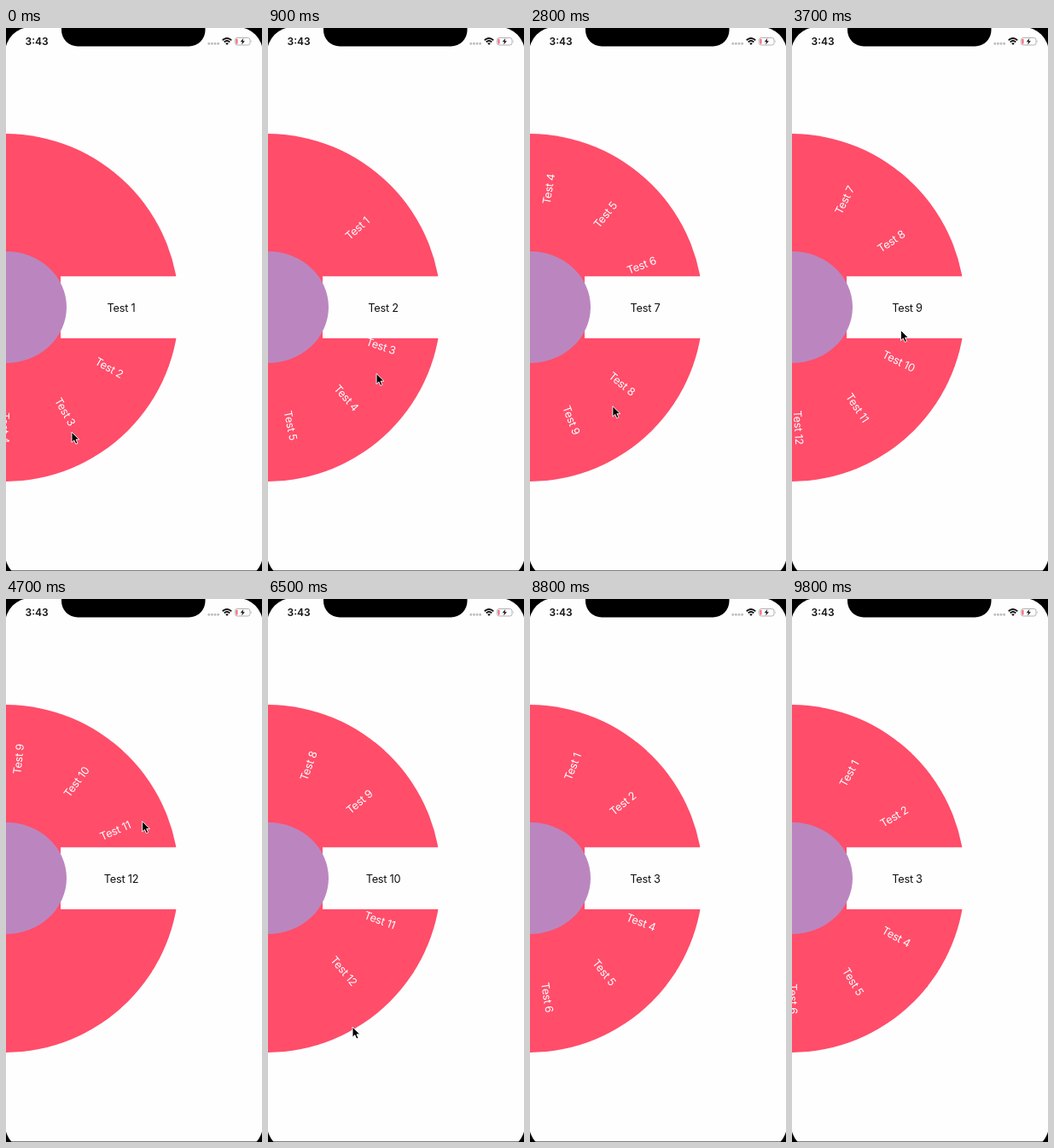
An HTML page for the animation above (10000 ms loop, 300 px wide and 637 px high).

```html
<!DOCTYPE html>
<html lang="en">
<head>
<meta charset="utf-8">
<title>Wheel picker</title>
<style>
  html, body { margin: 0; width: 100%; height: 100%; overflow: hidden; background: #000; }
  svg { display: block; width: 100%; height: 100%; }
  text { font-family: Inter, "Open Sans", sans-serif; }
  .label { font-size: 12.8px; letter-spacing: -.28px; text-anchor: middle; }
  .clock { font-size: 12px; font-weight: 600; }
</style>
</head>
<body>
<svg viewBox="0 0 300 637">
  <defs>
    <clipPath id="view"><rect width="300" height="636.5"/></clipPath>
  </defs>
  <rect width="300" height="637" fill="#000"/>
  <g clip-path="url(#view)">
    <rect x="-1" y="-1" width="302" height="648" rx="30" fill="#fffeff"/>
    <circle cx="-1.3" cy="328" r="204" fill="#ff4d6a"/>
    <g id="items" fill="#fff"></g>
    <rect x="64" y="291.3" width="236" height="72.7" fill="#fffeff"/>
    <ellipse cy="327.5" rx="71" ry="65.5" fill="#bb86bf"/>
    <text id="picked" class="label" x="135" y="332.6" fill="#111"></text>

    <path d="M65 0V2.500A19 19 0 0 0 84 21.500H214.500A19 19 0 0 0 233.500 2.500V0Z"/>
    <text class="clock" x="22.500" y="20" fill="#111">3:43</text>
    <path d="M237.800 18.300H249" stroke="#bdbdc0" stroke-width="3" stroke-linecap="round" stroke-dasharray="0 3.600"/>
    <g fill="none" stroke="#111" stroke-width="1.700">
      <path d="M253.700 14.400Q259 9.600 264.300 14.400"/>
      <path d="M255.700 16.500Q259 13.500 262.300 16.500"/>
    </g>
    <path d="M257.200 18Q259 16.500 260.800 18L259 19.900Z" fill="#111"/>
    <rect x="268.500" y="11.500" width="17.500" height="8.500" rx="2.400" fill="none" stroke="#a9a9ad" stroke-width=".9"/>
    <path d="M287 14.300Q288.500 15.700 287 17.200Z" fill="#a9a9ad"/>
    <rect x="269.700" y="12.700" width="1.600" height="6.100" rx=".8" fill="#f5465a"/>
    <path d="M278.300 12L274.700 16.300H277L276.200 19.600L279.900 15.200H277.500Z" fill="#111"/>

    <path id="cursor" d="M0 0V12.200L2.800 9.600L4.800 14.100L7 13.100L5 8.800H8.900Z"
      fill="#000" stroke="#fff" stroke-width=".9" stroke-linejoin="round"/>
  </g>
</svg>
<script>
const LOOP = 10000, STEP = 100, COUNT = 12, PITCH = 30, RADIUS = 141;
const RELEASE = 7600, REST = -60.5, DECAY = 374;

// Each swipe eases from one stop to the next
const swipes = [
  { t: 0, angle: 0 },
  { t: 1450, angle: -61 },
  { t: 2450, angle: -162 },
  { t: 5000, angle: -330 },
  { t: 7200, angle: -264 }
];
const pointer = [
  { t: 0, x: 77, y: 474 },
  { t: 1700, x: 169, y: 348 },
  { t: 2500, x: 94, y: 452 },
  { t: 4900, x: 161, y: 257 },
  { t: 6500, x: 99, y: 502 },
  { t: 7200, x: 95, y: 597 }
];

const smooth = u => u * u * (3 - 2 * u);

function ease(stops, t, key) {
  const next = stops.findIndex(s => s.t > t);
  if (next < 0) return stops[stops.length - 1][key];
  const a = stops[next - 1], b = stops[next];
  return a[key] + (b[key] - a[key]) * smooth((t - a.t) / (b.t - a.t));
}

// After release the wheel spins back and slows exponentially
function wheelAngle(t) {
  const angle = ease(swipes, t, "angle");
  return t < RELEASE ? angle : REST + (angle - REST) * Math.exp((RELEASE - t) / DECAY);
}

const byId = id => document.getElementById(id);
const picked = byId("picked"), cursor = byId("cursor");
const items = Array.from({ length: COUNT }, (_, i) => {
  const el = document.createElementNS("http://www.w3.org/2000/svg", "text");
  el.setAttribute("class", "label");
  el.setAttribute("x", RADIUS);
  el.setAttribute("y", 4.6);
  el.textContent = "Test " + (i + 1);
  return byId("items").appendChild(el);
});

function draw(time) {
  const t = Math.floor(time % LOOP / STEP) * STEP;
  const angle = wheelAngle(t);
  items.forEach((el, i) => {
    const a = angle + i * PITCH;
    el.setAttribute("transform", `translate(-1.2 328) rotate(${a.toFixed(2)})`);
    el.setAttribute("visibility", Math.abs(a) < 120 ? "visible" : "hidden");
  });
  picked.textContent = "Test " + (Math.round(-angle / PITCH) + 1);
  cursor.setAttribute("transform", `translate(${ease(pointer, t, "x")} ${ease(pointer, t, "y")})`);
  cursor.setAttribute("visibility", t < RELEASE ? "visible" : "hidden");
}

const start = performance.now();
function tick() {
  draw(performance.now() - start);
  requestAnimationFrame(tick);
}
tick();
</script>
</body>
</html>
```
